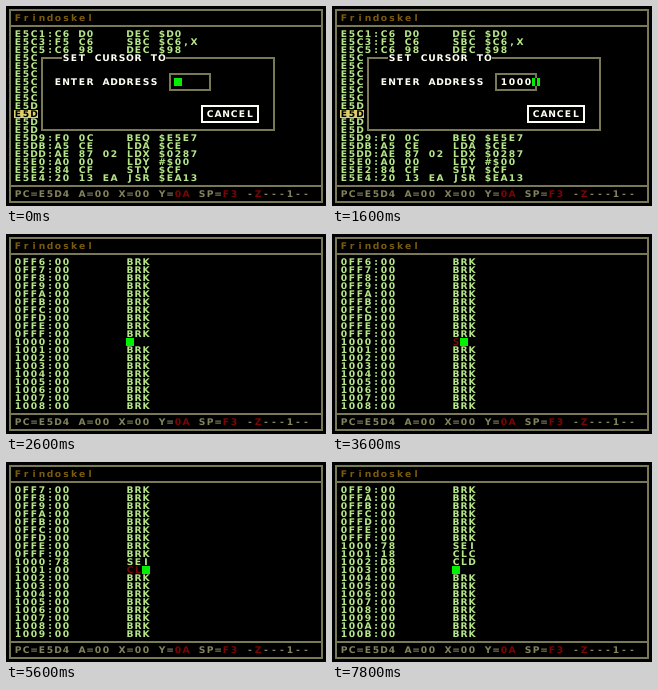
An HTML page for the animation above (8000 ms loop, 320 by 200 pixels).

```html
<!DOCTYPE html>
<html lang="en">
<head>
<meta charset="utf-8">
<title>Machine code monitor</title>
<style>
html, body { margin: 0; width: 100%; height: 100%; overflow: hidden; background: #000; }
svg { display: block; width: 100vw; height: 100vh; }
text {
  font: bold 9.2px "DejaVu Sans", "Liberation Sans", sans-serif;
  text-anchor: middle;
  text-rendering: geometricPrecision;
  white-space: pre;
}
</style>
</head>
<body>
<svg id="screen" viewBox="0 0 320 200" shape-rendering="crispEdges"></svg>
<script>
const CELL = 8, LOOP = 8000, LIST_TOP = 3, CURSOR_ROW = 13, CODE_COL = 15;
const color = {
  back: '#000', frame: '#7a7955', title: '#7a5a0c', status: '#83825c', alert: '#7c0404',
  code: '#b6e688', valid: '#e0d878', mark: '#dcd06c', cursor: '#00f000', bright: '#fffff4'
};
const program = [['78', 'SEI'], ['18', 'CLC'], ['D8', 'CLD']];
const romCode = [
  ['E5C1', 'C6 D0', 'DEC $D0'], ['E5C3', 'F5 C6', 'SBC $C6,X'], ['E5C5', 'C6 98', 'DEC $98'],
  ['E5C7', '98', 'TYA'], ['E5C8', '58', 'CLI'], ['E5C9', '18', 'CLC'],
  ['E5CA', '20 16 E7', 'JSR $E716'], ['E5CD', 'A5 C6', 'LDA $C6'], ['E5CF', '85 CC', 'STA $CC'],
  ['E5D1', '8D 92 02', 'STA $0292'], ['E5D4', 'F0 F7', 'BEQ $E5CD'], ['E5D6', '78', 'SEI'],
  ['E5D7', 'A5 CF', 'LDA $CF'], ['E5D9', 'F0 0C', 'BEQ $E5E7'], ['E5DB', 'A5 CE', 'LDA $CE'],
  ['E5DD', 'AE 87 02', 'LDX $0287'], ['E5E0', 'A0 00', 'LDY #$00'], ['E5E2', '84 CF', 'STY $CF'],
  ['E5E4', '20 13 EA', 'JSR $EA13']
];

// Each step: start time, then either dialog input or number of entered lines and typed text.
const steps = [
  { at: 0, input: '' }, { at: 800, input: '1' }, { at: 1000, input: '10' },
  { at: 1200, input: '100' }, { at: 1400, input: '1000' },
  { at: 1800, done: 0 },
  { at: 2600, done: 0, typed: '' }, { at: 3600, done: 0, typed: 'S' },
  { at: 3800, done: 0, typed: 'SE' }, { at: 4400, done: 0, typed: 'SEI' },
  { at: 4600, done: 1, typed: '' }, { at: 5400, done: 1, typed: 'C' },
  { at: 5600, done: 1, typed: 'CL' }, { at: 6400, done: 1, typed: 'CLC' },
  { at: 6800, done: 2, typed: '' }, { at: 7200, done: 2, typed: 'C' },
  { at: 7400, done: 2, typed: 'CLD' }, { at: 7800, done: 3, typed: '' }
];

const rect = (x, y, w, h, fill) =>
  `<rect x="${x}" y="${y}" width="${w}" height="${h}" fill="${fill}"/>`;

const fillCells = (col, row, w, h, fill) =>
  rect(col * CELL, row * CELL, w * CELL, h * CELL, fill);

function print(str, col, row, fill) {
  const xs = [...str].map((c, i) => (col + i + 0.5) * CELL).join(' ');
  return `<text xml:space="preserve" x="${xs}" y="${row * CELL + 7}" fill="${fill}">${str}</text>`;
}

// Two-pixel outline running through the middle of the border cells.
function outline(c1, r1, c2, r2, stroke) {
  const x = c1 * CELL + 4, y = r1 * CELL + 4;
  return `<rect x="${x}" y="${y}" width="${(c2 - c1) * CELL}" height="${(r2 - r1) * CELL}"` +
    ` fill="none" stroke="${stroke}" stroke-width="2"/>`;
}

const codeLine = ([addr, bytes, op]) => `${addr}:${bytes}`.padEnd(CODE_COL - 1) + op;

function listing(lines, marked) {
  return lines.map((line, i) => {
    const row = LIST_TOP + i, str = codeLine(line), on = marked && row === CURSOR_ROW;
    return (on ? fillCells(1, row, str.length, 1, color.mark) : '') +
      print(str, 1, row, on ? color.back : color.code);
  }).join('');
}

function memory(done, editing) {
  const cursorAddr = 0x1000 + done;
  return Array.from({ length: 19 }, (_, i) => {
    const addr = cursorAddr - 10 + i, n = addr - 0x1000;
    const [byte, op] = n >= 0 && n < done ? program[n] : ['00', 'BRK'];
    const hex = addr.toString(16).toUpperCase().padStart(4, '0');
    return [hex, byte, editing && n === done ? '' : op];
  });
}

function dialog(input) {
  const end = 21 + input.length;
  return fillCells(4, 6, 30, 10, color.back) +
    outline(4, 6, 33, 15, color.frame) +
    fillCells(7, 6, 13, 1, color.back) +
    print('SET CURSOR TO', 7, 6, color.bright) +
    print('ENTER ADDRESS', 6, 9, color.bright) +
    outline(20, 8, 25, 10, color.frame) +
    print(input, 21, 9, color.bright) +
    fillCells(end, 9, 1, 1, color.cursor) +
    (end === 25 ? rect(203, 72, 2, 8, color.back) : '') +
    outline(24, 12, 31, 14, color.bright) +
    print('CANCEL', 25, 13, color.bright);
}

function editor(typed, done) {
  const ok = typed === program[done]?.[1];
  return print(typed, CODE_COL, CURSOR_ROW, ok ? color.valid : color.alert) +
    fillCells(CODE_COL + typed.length, CURSOR_ROW, 1, 1, color.cursor);
}

const chrome = rect(0, 0, 320, 200, color.back) +
  outline(0, 0, 39, 24, color.frame) +
  rect(4, 19, 312, 2, color.frame) +
  rect(4, 179, 312, 2, color.frame) +
  print('Frindoskel', 1, 1, color.title) +
  print('PC=E5D4 A=00 X=00 Y=   SP=   - ---1--', 1, 23, color.status) +
  print('0A', 21, 23, color.alert) +
  print('F3', 27, 23, color.alert) +
  print('Z', 31, 23, color.alert);

function scene({ input, done, typed }) {
  if (input !== undefined) return chrome + listing(romCode, true) + dialog(input);
  const editing = typed !== undefined;
  return chrome + listing(memory(done, editing), !editing) +
    (editing ? editor(typed, done) : '');
}

const screenEl = document.getElementById('screen');
const start = performance.now();
let shown = null;

function draw(now) {
  const t = Math.max(0, now - start) % LOOP;
  const step = steps.findLast(s => s.at <= t);
  if (step !== shown) {
    screenEl.innerHTML = scene(step);
    shown = step;
  }
  requestAnimationFrame(draw);
}
draw(start);
</script>
</body>
</html>
```
